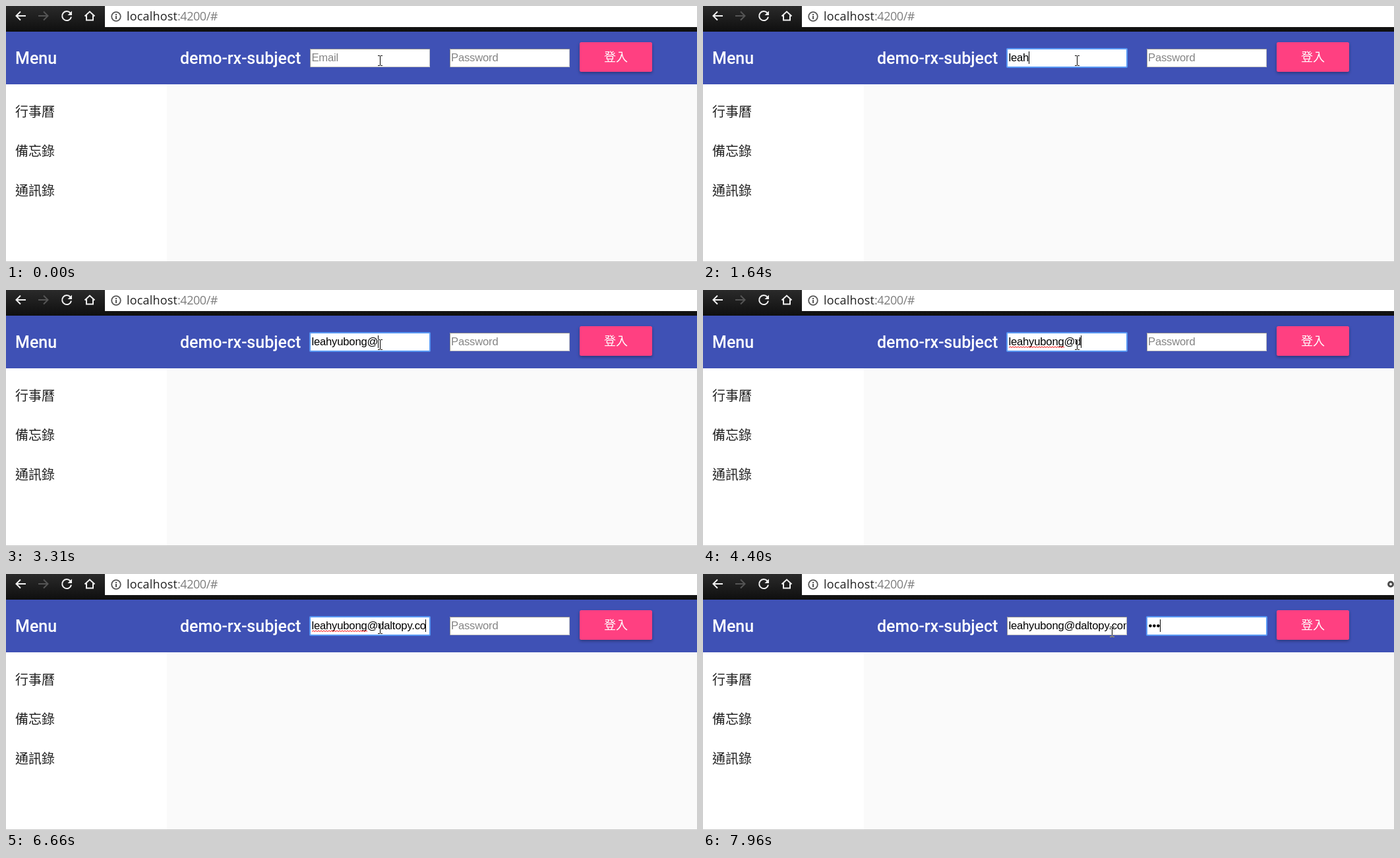
An HTML page that plays this animation: 1048x389 px, repeating every 8000 ms.

```html
<!DOCTYPE html>
<html lang="zh-Hant">
<head>
<meta charset="utf-8">
<title>demo-rx-subject</title>
<style>
  html, body { margin: 0; width: 100%; height: 100%; overflow: hidden; background: #fafafa; }
  svg { display: block; width: 100%; height: 100%; }
  text { white-space: pre; }
  .title { font: 500 25px Roboto, sans-serif; fill: #fff; }
  .item { font: 20px "Noto Sans CJK TC", "Noto Sans CJK", sans-serif; fill: #212121; }
  .login { font: 18px "Noto Sans CJK TC", "Noto Sans CJK", sans-serif; fill: #fff; }
  .url { font: 18px "Open Sans", sans-serif; fill: #222; letter-spacing: .18px; }
  .port { fill: #7d7d7d; letter-spacing: -.45px; }
  .field { font: 16.67px "Liberation Sans", Arial, sans-serif; letter-spacing: -.2px; }
  .hint { fill: #858585; }
  .dots { letter-spacing: .2px; }
  .icon { fill: none; stroke: #f2f2f2; stroke-width: 2; }
  .button { fill: #ff4081; filter: drop-shadow(0 2px 2px rgba(0, 0, 0, .32)); }
  .ring { fill: none; stroke: #5a9af5; stroke-width: 2; }
  #pointer { mix-blend-mode: difference; }
</style>
</head>
<body>
<svg viewBox="0 0 1048 389">
  <defs>
    <linearGradient id="chrome" x2="0" y2="1">
      <stop offset="0" stop-color="#2a2a2a"/>
      <stop offset="1" stop-color="#0f0f0f"/>
    </linearGradient>
    <clipPath id="inner"><rect x="462" y="66" width="180" height="26"/></clipPath>
    <g id="box">
      <rect width="182" height="28" fill="#fff"/>
      <path d="M.5 28V.5H182" fill="none" stroke="#939393"/>
      <path d="M1 27.5H181.5V1" fill="none" stroke="#c2c2c2"/>
    </g>
  </defs>

  <rect width="1048" height="389" fill="#fafafa"/>
  <rect y="119" width="244" height="270" fill="#fff"/>
  <rect y="388" width="1048" height="1" fill="#c8c8c8"/>

  <rect width="1048" height="39" fill="url(#chrome)"/>
  <rect x="150" width="898" height="32" fill="#fff"/>
  <g class="icon">
    <path d="M30 15H16M22 8.5L15.5 15L22 21.5"/>
    <path d="M49 15H63M57 8.5L63.5 15L57 21.5" stroke="#555"/>
    <path d="M97.5 10.5A7 7 0 1 0 99 16.5"/>
    <path d="M100 7.5V14H93.5Z" fill="#f2f2f2" stroke="none"/>
    <path d="M119.5 15.5L127 8.5L134.5 15.5M122 14V21.5H132V14"/>
    <g stroke="#555">
      <circle cx="167" cy="16" r="6.8" stroke-width="1.8"/>
      <path d="M167 15V20M167 12V14"/>
    </g>
    <circle id="key" cx="1043" cy="15.5" r="3.4" stroke="#4a4a4a" stroke-width="3"/>
  </g>
  <text class="url" x="183" y="22">localhost<tspan class="port" x="260">:4200/#</tspan></text>

  <rect y="39" width="1048" height="80" fill="#3f51b5"/>
  <text class="title" x="14" y="88">Menu</text>
  <text class="title" x="264" y="88">demo-rx-subject</text>
  <text class="item" x="14" y="167.5">行事曆</text>
  <text class="item" x="14" y="227.5">備忘錄</text>
  <text class="item" x="14" y="287.5">通訊錄</text>

  <rect class="button" x="870" y="55" width="110" height="45" rx="2.5"/>
  <text class="login" x="907" y="84">登入</text>

  <use href="#box" x="461" y="65"/>
  <use href="#box" x="673" y="65"/>
  <rect id="ring" class="ring" y="65" width="182" height="28" rx="1"/>
  <g class="field">
    <text id="emailHint" class="hint" x="463.4" y="84">Email</text>
    <text id="passHint" class="hint" x="675" y="84">Password</text>
    <g clip-path="url(#inner)">
      <g id="scroll">
        <text id="email" x="463.4" y="84"></text>
        <path id="squiggle" fill="none" stroke="#f00" stroke-width="1"/>
      </g>
    </g>
    <text id="pass" class="dots" x="675.4" y="84"></text>
  </g>
  <rect id="caret" y="69" width="1" height="19"/>
  <path id="pointer" fill="none" stroke="#fff" d="M-3 -7.5H0M1 -7.5H4M.5 -7V7M-3 7.5H0M1 7.5H4"/>
</svg>
<script>
  const LOOP = 8000;
  const ADDRESS = 'leahyubong@daltopy.com';
  const emailKeys = [
    880, 1020, 1480, 1640, 1950, 2240, 2350, 2460, 2690, 2770, 3310,
    4400, 4690, 4920, 5310, 5510, 5710, 5910, 6150, 6290, 6520, 6700
  ];
  const passKeys = [7280, 7590, 7710];
  const FOCUS = 200, CARET = 260, SPELL = 3390, TAB = 6890;
  const caretOff = [[0, CARET], [650, 880], [3920, 4400]];
  const moves = [[0, 567, 83], [7840, 594, 85], [7960, 620, 88]];

  const el = {};
  document.querySelectorAll('svg [id]').forEach(n => { el[n.id] = n; });

  const set = (node, name, value) => node.setAttribute(name, value);
  const show = (node, on) => set(node, 'visibility', on ? 'visible' : 'hidden');
  const count = (times, t) => times.filter(k => k <= t).length;

  let wave = 'M464 87.5';
  for (let x = 464; x < 548; x += 4) wave += 'l2 -1.6l2 1.6';
  set(el.squiggle, 'd', wave);

  function render(t) {
    const typed = count(emailKeys, t);
    const dots = count(passKeys, t);
    const inPass = t >= TAB;

    el.email.textContent = ADDRESS.slice(0, typed);
    el.pass.textContent = '•'.repeat(dots);
    show(el.emailHint, !typed);
    show(el.passHint, !dots);
    show(el.key, dots > 0);
    show(el.squiggle, t >= SPELL && !inPass);

    show(el.ring, t >= FOCUS);
    set(el.ring, 'x', inPass ? 673 : 461);

    const emailEnd = 463.4 + (typed ? el.email.getComputedTextLength() : 0);
    const shift = inPass ? 0 : Math.min(0, 641 - emailEnd);
    set(el.scroll, 'transform', `translate(${shift} 0)`);

    const passEnd = 675.6 + (dots ? el.pass.getComputedTextLength() : 0.6);
    set(el.caret, 'x', Math.floor(inPass ? passEnd : emailEnd + shift + (typed ? 0 : 1)));
    show(el.caret, !caretOff.some(([from, to]) => t >= from && t < to));

    const [, x, y] = moves[count(moves.map(m => m[0]), t) - 1];
    set(el.pointer, 'transform', `translate(${x} ${y})`);
  }

  const start = performance.now();
  function tick() {
    render((performance.now() - start) % LOOP);
    requestAnimationFrame(tick);
  }
  tick();
</script>
</body>
</html>
```
